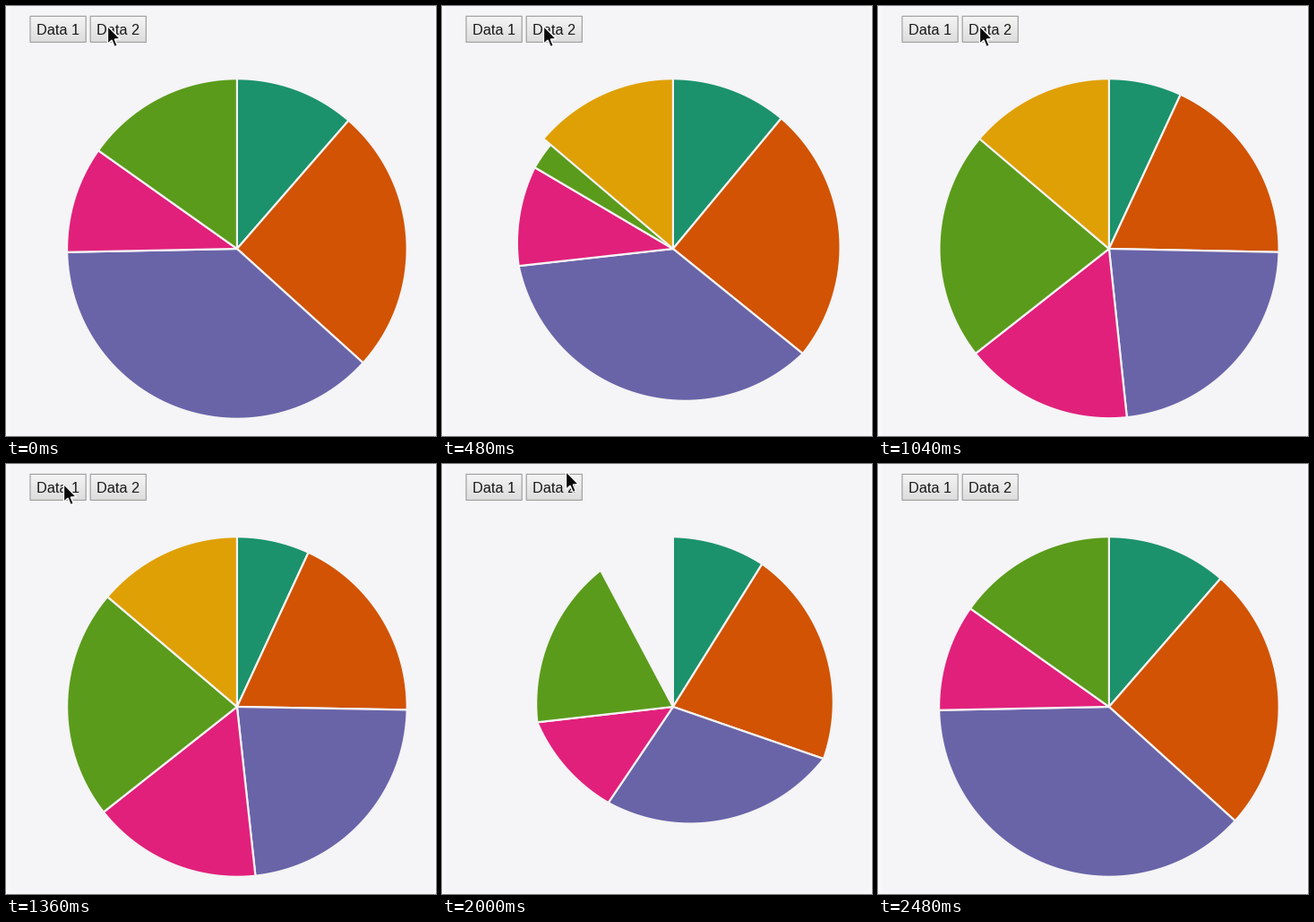
A matplotlib script that plays this animation: 480 px wide and 480 px high, repeating every 2800 ms.

```python
import numpy as np
import matplotlib.pyplot as plt
from matplotlib.animation import FuncAnimation
from matplotlib.patches import Polygon, Rectangle

SIZE, DPI = 480, 100
STEP, FRAMES = 80, 35
PX = 72 / DPI  # points per pixel

CENTER = 257.9 + 271j
RADIUS = 189.8
COLORS = ["#1b926b", "#d15303", "#6964a8", "#e1207b", "#5a9b1b", "#dfa005"]
DATA_1 = [9, 20, 30, 8, 12]
DATA_2 = [6, 16, 20, 14, 19, 12]

MORPH = 880                  # length of one transition in ms
TO_2, TO_1 = 238, 1578       # transition starts
PRESS_1, PRESS_2 = (1600, 1600), (80, 240)
CURSOR_T = [1120, 1360, 1680, 1840, 2000]
CURSOR_X = [113.5, 64.5, 64.5, 95, 138.5]
CURSOR_Y = [22.5, 22.5, 22.5, 19, 8.5]
CURSOR_GONE = 2160
ARROW = 1.2 * np.array([(0, 0), (0, 16.5), (3.8, 13), (6.4, 19.2),
                        (9, 18.1), (6.5, 12.1), (11.6, 11.8)])


def rim(data):
    """Points on the circle where the slices meet, clockwise from the top."""
    turn = np.concatenate([[0], np.cumsum(data)]) / sum(data)
    return -1j * RADIUS * np.exp(2j * np.pi * turn)


def ease(t):
    t = min(max(t, 0), 1)
    return 4 * t**3 if t < 0.5 else 1 - 4 * (1 - t)**3


def slice_points(a, b):
    """Wedge whose rim is the short clockwise arc of fixed radius from a to b."""
    half = abs(b - a) / 2
    u = (b - a) / abs(b - a)
    mid = (a + b) / 2 + 1j * u * np.sqrt(max(RADIUS**2 - half**2, 0))
    sweep = 2 * np.arcsin(min(half / RADIUS, 1))
    arc = mid + (a - mid) * np.exp(1j * np.linspace(0, sweep, 70))
    z = np.append(arc, 0) + CENTER
    return np.column_stack([z.real, z.imag])


fig = plt.figure(figsize=(SIZE / DPI, SIZE / DPI), dpi=DPI, facecolor="#f5f5f8")
ax = fig.add_axes([0, 0, 1, 1])
ax.axis("off")

for x, w in ((0, 5), (477, 3)):
    ax.add_patch(Rectangle((x, 0), w, SIZE, fc="#f8f8fa", lw=0))


def make_button(x, w, label):
    shade = np.linspace(0.955, 0.865, 30)[:, None]
    ax.imshow(shade, cmap="gray", vmin=0, vmax=1, aspect="auto",
              extent=(x, x + w, 40.4, 11.4), zorder=1)
    box = dict(ec="#a2a2a2", lw=1.2 * PX, snap=False, zorder=2)
    ax.add_patch(Rectangle((x, 11.4), w, 29, fill=False, **box))
    pressed = ax.add_patch(Rectangle((x, 11.4), w, 29, fc="#adadad", **box))
    text = ax.text(x + w / 2, 31.7, label, family="Liberation Sans",
                   size=16.4 * PX, ha="center", va="baseline", zorder=3)
    return pressed, text


buttons = [make_button(27, 62.2, "Data 1"), make_button(94.2, 62.2, "Data 2")]
presses = [PRESS_1, PRESS_2]

slices = [ax.add_patch(Polygon([(0, 0), (1, 0), (0, 1)], fc=c, ec="#f5f4f5",
                               lw=2.2 * PX, joinstyle="miter", snap=False,
                               zorder=4))
          for c in COLORS]
cursor = ax.add_patch(Polygon(ARROW, fc="#0a0a0a", ec="white", lw=1.3 * PX,
                              zorder=6))
ax.set_xlim(0, SIZE)
ax.set_ylim(SIZE, 0)

RIM_1, RIM_2 = rim(DATA_1), rim(DATA_2)


def draw(frame):
    t = frame * STEP
    k = ease((t - TO_2) / MORPH) - ease((t - TO_1) / MORPH)
    ends = RIM_1 + (RIM_2[:6] - RIM_1) * k
    for i, patch in enumerate(slices[:5]):
        patch.set_xy(slice_points(ends[i], ends[i + 1]))
    slices[5].set_xy(slice_points(RIM_2[5], RIM_2[6]))
    slices[5].set_visible(TO_2 <= t < TO_1)

    for (shade, text), (start, end) in zip(buttons, presses):
        down = start <= t <= end
        shade.set_visible(down)
        text.set_color("#ececec" if down else "#1a1a1a")

    tip = [np.interp(t, CURSOR_T, CURSOR_X), np.interp(t, CURSOR_T, CURSOR_Y)]
    cursor.set_xy(ARROW + tip)
    cursor.set_visible(t < CURSOR_GONE)
    return [*slices, cursor]


anim = FuncAnimation(fig, draw, frames=FRAMES, interval=STEP, repeat=True,
                     repeat_delay=0, blit=False)
plt.show()
```
